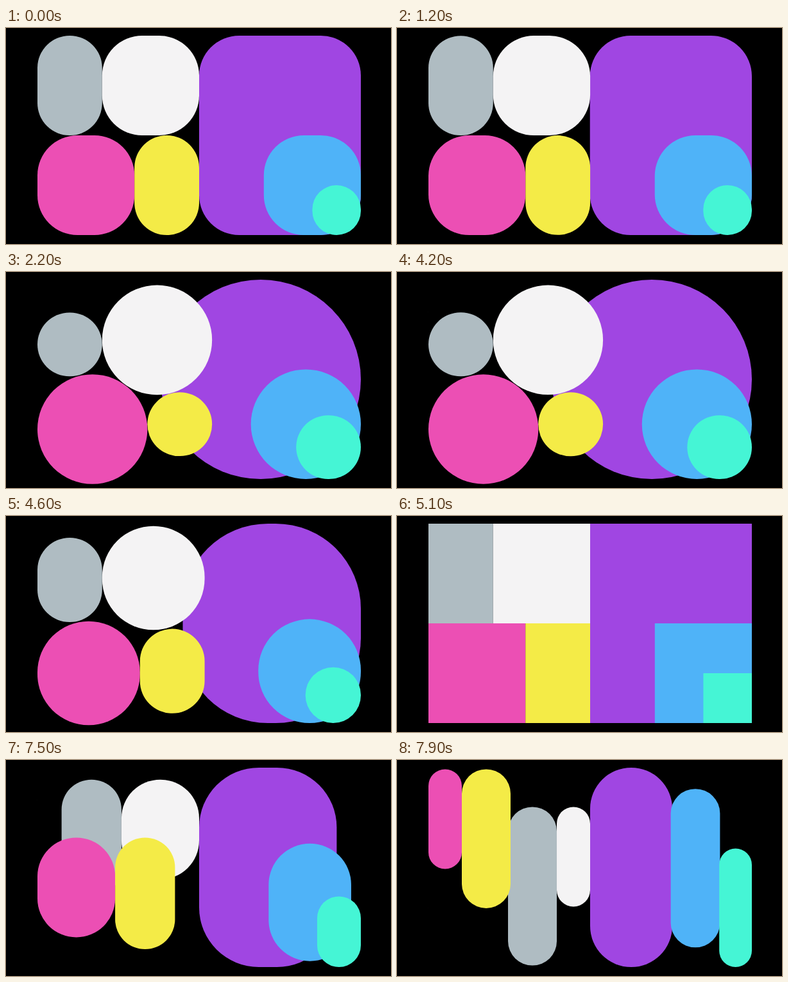
An HTML page that plays this animation: 600x338 px, repeating every 8 s.

```html
<!DOCTYPE html>
<html lang="en">
<head>
<meta charset="utf-8">
<title>Morphing blocks</title>
<style>
  html, body { margin: 0; width: 100%; height: 100%; overflow: hidden; background: #000; }
  svg { display: block; width: 100%; height: 100%; }
</style>
</head>
<body>
<svg id="stage" viewBox="0 0 600 338"></svg>
<script>
const LOOP = 8000, STEP = 100, LEAD = 20;
const FIRST = 1100, PERIOD = 3000, MORPH = 950;
const LEFT = 49, TOP = 12, WIDTH = 504, HEIGHT = 312;

// Boxes are [x, y, w, h] as fractions of the board: tiles, circles, bars.
const shapes = [
  { fill: '#a046e2', tiles: [.5, 0, .5, 1], circles: [.381, 0, .619, 1], bars: [.5, 0, .25, 1] },
  { fill: '#afbcc2', tiles: [0, 0, .2, .5], circles: [0, .165, .2, .32], bars: [.25, .2, .15, .8] },
  { fill: '#f4f3f4', tiles: [.2, 0, .3, .5], circles: [.2, .0275, .34, .55], bars: [.4, .2, .1, .5] },
  { fill: '#ec4fb4', tiles: [0, .5, .3, .5], circles: [0, .475, .34, .55], bars: [0, 0, .1, .5] },
  { fill: '#f4eb47', tiles: [.3, .5, .2, .5], circles: [.34, .565, .2, .32], bars: [.1, 0, .15, .7] },
  { fill: '#4fb3f8', tiles: [.7, .5, .3, .5], circles: [.66, .45, .34, .55], bars: [.75, .1, .15, .8] },
  { fill: '#45f5d5', tiles: [.85, .75, .15, .25], circles: [.8, .68, .2, .32], bars: [.9, .4, .1, .6] }
];

const poses = [
  { layout: 'tiles', radius: .2 },
  { layout: 'circles', radius: 1 },
  { layout: 'tiles', radius: 0 },
  { layout: 'bars', radius: 1 }
];

const stage = document.getElementById('stage');
for (const shape of shapes) {
  shape.node = document.createElementNS('http://www.w3.org/2000/svg', 'rect');
  shape.node.setAttribute('fill', shape.fill);
  stage.append(shape.node);
}

const mix = (a, b, p) => a + (b - a) * p;
const ease = p => p < .5 ? 4 * p ** 3 : 1 - 4 * (1 - p) ** 3;

function draw(time) {
  const since = time - FIRST;
  const index = Math.max(0, Math.floor(since / PERIOD));
  const p = ease(Math.min(1, Math.max(0, (since - index * PERIOD) / MORPH)));
  const from = poses[index], to = poses[index + 1];
  const radius = mix(from.radius, to.radius, p) * HEIGHT;

  for (const shape of shapes) {
    const end = shape[to.layout];
    const [x, y, w, h] = shape[from.layout].map((v, i) => mix(v, end[i], p));
    const width = w * WIDTH, height = h * HEIGHT;
    const rx = Math.min(radius, width / 2, height / 2);
    const box = { x: LEFT + x * WIDTH, y: TOP + y * HEIGHT, width, height, rx, ry: rx };
    for (const key in box) shape.node.setAttribute(key, box[key].toFixed(2));
  }
}

// The motion runs at ten pictures a second.
const start = performance.now();
function tick() {
  const time = (performance.now() - start + LEAD) % LOOP;
  draw(Math.floor(time / STEP) * STEP);
  requestAnimationFrame(tick);
}
tick();
</script>
</body>
</html>
```
